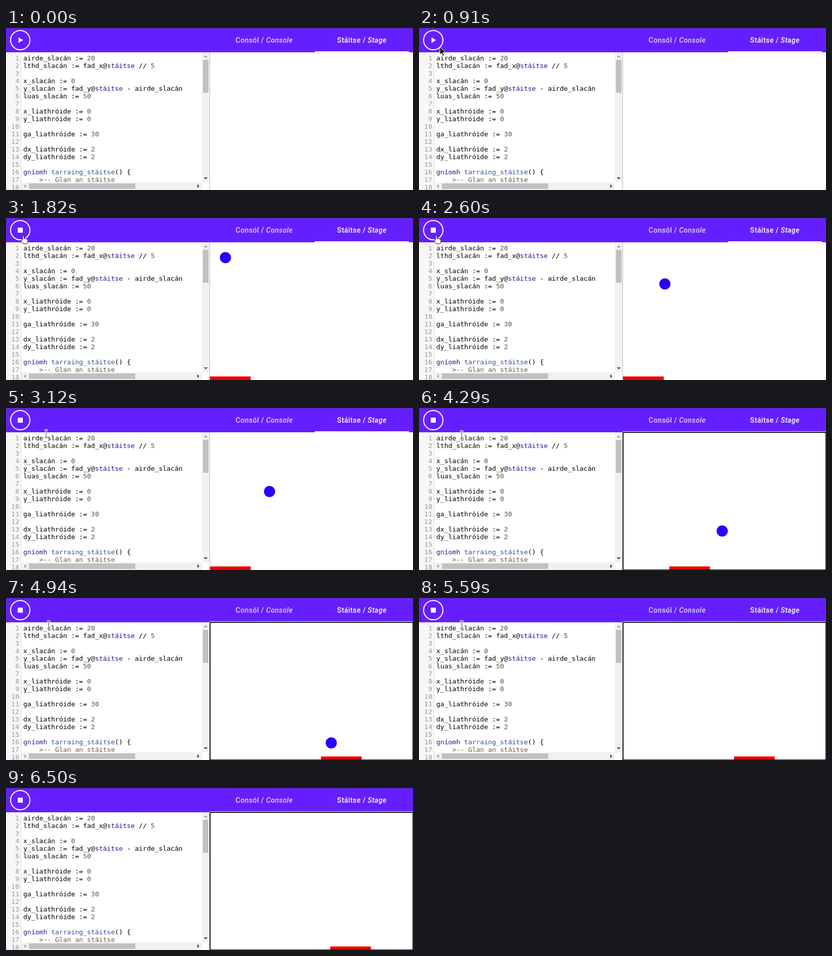
These frames come from a looping animation (800x320 px, 6.63 s). An HTML page:

```html
<!DOCTYPE html>
<html lang="ga">
<head>
<meta charset="utf-8">
<title>Stáitse</title>
<style>
html, body { margin: 0; width: 100%; height: 100%; overflow: hidden; background: #fff; }
div, pre, svg { position: absolute; margin: 0; }
#app { left: 0; top: 0; width: 800px; height: 320px; overflow: hidden; }
#bar { width: 800px; height: 48px; background: #651fff; box-shadow: inset 1px 1px #5229b4; }
.tab { top: 12px; width: 185px; text-align: center; color: #fff; white-space: nowrap;
  font: 500 14px/24px Roboto, sans-serif; letter-spacing: .4px; }
#line { left: 607px; top: 46px; width: 185px; height: 2px; background: #fff; }
pre { font: 13px/15px "DejaVu Sans Mono", monospace; }
#gutter { left: 0; top: 48px; width: 26px; height: 272px; padding: 4px 3px 0 0; box-sizing: content-box;
  background: #f7f7f7; border-right: 1px solid #ddd; color: #999; text-align: right; }
#code { left: 30px; top: 48px; width: 351px; height: 253px; padding: 4px 0 0 4px; overflow: hidden; color: #000; }
.n { color: #3f5c50; } .a { color: #2a1499; } .d { color: #2f4f9f; } .c { color: #70593a; }
#ring { left: 400px; top: 47px; width: 397px; height: 270px; border: 2px solid #101010;
  border-radius: 3px; box-shadow: 0 0 0 1px #fff; }
svg { left: 0; top: 0; }
</style>
</head>
<body>
<div id="app">
  <div id="bar"></div>
  <div class="tab" style="left:415px;opacity:.8">Consól / <i>Console</i></div>
  <div class="tab" style="left:607px">Stáitse / <i>Stage</i></div>
  <div id="line"></div>
  <pre id="gutter"></pre>
  <pre id="code">airde_slacán := <span class="n">20</span>
lthd_slacán := fad_x@<span class="a">stáitse</span> // <span class="n">5</span>

x_slacán := <span class="n">0</span>
y_slacán := fad_y@<span class="a">stáitse</span> - airde_slacán
luas_slacán := <span class="n">50</span>

x_liathróide := <span class="n">0</span>
y_liathróide := <span class="n">0</span>

ga_liathróide := <span class="n">30</span>

dx_liathróide := <span class="n">2</span>
dy_liathróide := <span class="n">2</span>

<span class="a">gníomh</span> <span class="d">tarraing_stáitse</span>() {
    <span class="c">&gt;-- Glan an stáitse</span></pre>
  <svg width="800" height="320">
    <clipPath id="stage"><path d="M401 48H800V320H401z"/></clipPath>
    <path fill="#f1f1f1" d="M385 48h15v257h-15zM30 305h355v15H30z"/>
    <path fill="#c1c1c1" d="M387 63h11v65h-11zM45 307h209v11H45z"/>
    <path fill="#a3a3a3" d="M388.5 58l4-4 4 4zM39 308.500l-4 4 4 4z"/>
    <path fill="#505050" d="M388.500 295l4 4 4-4zM376 308.500l4 4-4 4z"/>
    <path fill="#bbb" d="M400 48h1v272h-1z"/>
    <circle cx="28" cy="24" r="19" fill="none" stroke="#fff" stroke-width="2"/>
    <path id="play" fill="#fff" d="M24.500 18.500v11l9-5.500z"/>
    <path id="stop" fill="#fff" d="M23 19h10v10H23z"/>
    <g id="game" clip-path="url(#stage)">
      <rect id="bat" y="313" width="80" height="7" fill="#f00000"/>
      <circle id="ball" r="11" fill="#2a00ff"/>
    </g>
  </svg>
  <div id="ring"></div>
  <svg width="800" height="320">
    <g id="cursor" stroke-linejoin="round">
      <path id="arrow" fill="#111" stroke="#fff" d="M0 0v16l3.700-3.500 2.500 5.700 2.500-1.100-2.500-5.500h5z"/>
      <path id="hand" fill="#fff" stroke="#111" d="M-1.500 9V1q1.500-2 3 0v5q1.500-1 2.700.3 1.500-.8 2.600.5 1.800-.5 2.200 1v4q0 2-1.500 4.200h-7.500L-5 10q.8-2 3.500-1z"/>
      <g id="beam" fill="none">
        <path stroke="#fff" stroke-width="3" d="M-3.500-7.500h7M0-8V8M-3.500 7.500h7"/>
        <path stroke="#333" d="M-3-7.500h6M0-8V8M-3 7.500h6"/>
      </g>
    </g>
  </svg>
</div>
<script>
const LOOP = 6630, TICK = 130, START = 1430, FOCUS = 3380;
const $ = id => document.getElementById(id);
const show = (id, on) => $(id).style.display = on ? '' : 'none';
const clamp = v => Math.max(0, Math.min(1, v));

$('gutter').textContent = Array.from({length: 18}, (_, i) => i + 1).join('\n');

// time, x, y of the pointer
const path = [[260, 150, 310], [910, 41, 37], [1300, 34, 35], [2600, 34, 35], [3250, 84, 53]];

function pointer(t) {
  let i = 0;
  while (i < path.length - 2 && t >= path[i + 1][0]) i++;
  const [a, b] = [path[i], path[i + 1]];
  const p = clamp((t - a[0]) / (b[0] - a[0])), e = p * p * (3 - 2 * p);
  return [a[1] + (b[1] - a[1]) * e, a[2] + (b[2] - a[2]) * e];
}

// first key press, then key repeat, then one late press
function batSteps(t) {
  if (t < 3510) return 0;
  return 1 + Math.round(11 * clamp((t - 4020) / 715)) + (t >= 5980);
}

function draw(now) {
  const t = Math.floor(now % LOOP / TICK) * TICK;
  const on = t >= START;
  show('play', !on);
  show('stop', on);
  show('game', on);
  show('ring', t >= FOCUS);
  show('line', t < FOCUS);

  const d = 30 + (t - 1820) / 15;
  $('ball').setAttribute('cx', 401.3 + d);
  $('ball').setAttribute('cy', 48.3 + d);
  $('bat').setAttribute('x', 401 + 18.18 * batSteps(t));

  const [x, y] = pointer(t);
  const hand = Math.hypot(x - 28, y - 24) < 17, beam = y > 48 && x > 30;
  show('cursor', t >= 260 && t < 5980);
  show('hand', hand);
  show('beam', beam);
  show('arrow', !hand && !beam);
  $('cursor').setAttribute('transform', `translate(${Math.round(x)} ${Math.round(y)})`);
}

const begin = performance.now();
function frame() {
  draw(performance.now() - begin);
  requestAnimationFrame(frame);
}
frame();
</script>
</body>
</html>
```
